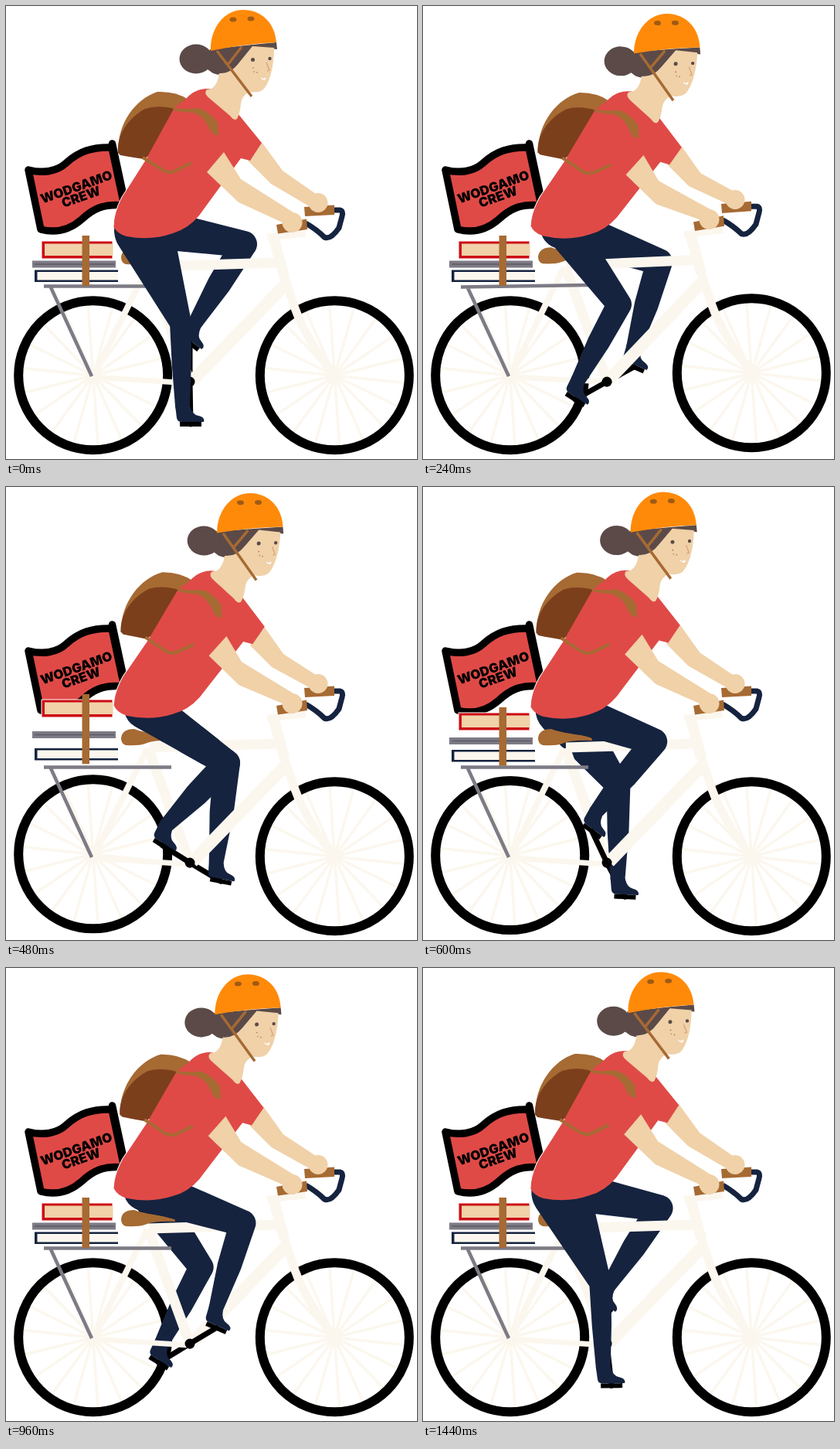
An HTML page for the animation above (1500 ms loop, 532 by 586 pixels).

```html
<!DOCTYPE html>
<html lang="en">
<head>
<meta charset="utf-8">
<title>Cyclist</title>
<style>
html, body { margin: 0; width: 100%; height: 100%; overflow: hidden; background: #fff; }
svg { display: block; width: 100%; height: 100%; }
.cream { fill: none; stroke: #fcf7ee; }
.skin { fill: #f0d1a8; }
.navy { fill: #15233f; }
.red { fill: #df4a47; }
.brown { fill: #a66a33; }
.strap { fill: none; stroke: #a66a33; }
.hair { fill: #5b4a48; }
.crank { stroke: #000; stroke-width: 7; stroke-linecap: round; }
text { font: 900 16.8px Inter, "Liberation Sans", Arial, sans-serif; text-anchor: middle; }
</style>
</head>
<body>
<svg viewBox="0 0 532 586">
  <g id="rear"></g>
  <g id="front"></g>

  <g id="farLeg"></g>

  <g id="frame">
    <g class="cream">
      <path d="M113 479L183 338" stroke-width="8"/>
      <path d="M113 480L238 488" stroke-width="7"/>
      <path d="M185 337L352 332" stroke-width="13"/>
      <path d="M184 338L238 486" stroke-width="13"/>
      <path d="M364 358L241 485" stroke-width="16"/>
      <path d="M346 298L360 350" stroke-width="14"/>
      <path d="M357 340L374 391Q388 430 425 478" stroke-width="11"/>
      <path d="M338 299L388 294" stroke-width="9"/>
    </g>
    <path d="M49 362.5H214M58 364L111 479" fill="none" stroke="#7d7b85" stroke-width="4.5"/>
    <path class="brown" d="M149 325Q150 313 166 313Q178 318 212 322Q219 323 219 328Q192 327 180 332Q172 335 155 334Q149 332 149 325Z"/>
    <path d="M424 264H432Q437 265 435 272L431 287Q420 303 412 299Q402 289 388 281" fill="none" stroke="#15233f" stroke-width="7"/>
    <path class="brown" d="M386 260L425 257.5V270L387 272ZM350 283L389 275.5L390 289L352 294.5Z"/>
  </g>

  <g id="nearLeg"></g>
  <g class="skin">
    <path id="farArm"/>
    <circle id="farHand" cx="404" cy="254.5" r="12.5"/>
  </g>

  <g stroke="#000" stroke-width="9.5" stroke-linejoin="round" stroke-linecap="round">
    <path class="red" d="M29 212C48 217 66 214 78 203C94 188 112 182 137 183L153 258C126 255 112 263 98 276C82 290 64 294 45 289Z"/>
    <path d="M137.500 178L153 250"/>
  </g>
  <g transform="rotate(-19.5 91 234)">
    <text x="91" y="240">WODGAMO</text>
    <text x="92.500" y="254">CREW</text>
  </g>

  <g id="torso">
    <path class="brown" d="M145 190C144 151 168 120 196 111Q220 110 236 121L190 190Z"/>
    <path d="M145 190C143 167 158 145 180 133Q198 127 222 134L186 199Q164 196 148 193Z" fill="#7b3f1c"/>
    <path class="red" d="M262 107Q244 106 231 122Q221 128 216 135L183 195L150 247Q139 268 139 285Q144 295 156 298Q188 304 216 294Q236 288 250 271L304 197L316 200L331 177L300 139L280 110Z"/>
    <path d="M183 195L150 247Q139 268 139 285" fill="none" stroke="#fff"/>
    <path class="strap" d="M177 196L204 213Q212 217 220 213L240 203" stroke-width="4"/>
    <path class="brown" d="M215 132Q234 134 248 132Q262 135 274 151L275 167Q269 169 263 159Q256 142 242 138L219 136Z"/>
    <path class="hair" d="M264 56L319 50L350 47L351 56L319 53L300 76Q286 94 268 87L258 80Z"/>
    <ellipse id="bun" class="hair" cx="246" cy="68.5" rx="21.5" ry="19"/>
    <path class="skin" d="M319 52L347 54C347 74 343 96 334 107Q328 113 315 111Q305 116 304 126Q303 139 299 146Q295 149 290 142L264 120Q255 113 260 108Q273 108 276 87Q291 88 302 73Z"/>
    <path d="M265 58C264 28 283 5 307 5C331 5 348 22 350 47Q308 49 265 58Z" fill="#ff8a0a"/>
    <g fill="#a05a14"><ellipse cx="294" cy="17.5" rx="4.5" ry="3"/><ellipse cx="317" cy="16.5" rx="4.5" ry="3"/></g>
    <path class="strap" d="M273 58L318 117M305 53L287 76" stroke-width="3.5"/>
    <g class="hair"><circle cx="319.5" cy="69.5" r="2.5"/><circle cx="341.5" cy="68" r="2.2"/></g>
    <path d="M337 73L341 83L338 84" fill="none" stroke="#dca780" stroke-width="1.5"/>
    <path d="M330 93Q333 96 336 93Q336 98 330 93Z" fill="#fff" stroke="#fff"/>
    <g fill="#a66a33"><circle cx="320" cy="80" r=".8"/><circle cx="325" cy="86" r=".8"/><circle cx="321" cy="85" r=".7"/></g>
  </g>

  <g id="bookC"><path class="navy" d="M37 341.500H145V357H37Z"/><path d="M40.500 344H145V354.500H40.500Z" fill="#fcf7ee"/></g>
  <g id="bookB"><path d="M34 329.500H142V338.500H34Z" fill="#7d7b85"/><path d="M37 334H140" stroke="#5e5a66" stroke-width="1.5"/></g>
  <g id="bookA"><path d="M46 304H138V327H46Z" fill="#cc0a14" stroke="#fff"/><path class="skin" d="M50 307.500H138.500V323H50Z"/></g>
  <rect id="band" class="brown" x="98.500" width="9.500"/>

  <g class="skin">
    <path id="nearArm"/>
    <circle id="nearHand" cx="370.500" cy="280" r="13"/>
  </g>
</svg>
<script>
const LOOP = 1500, STEP = 60, HUB = [238, 486];
const $ = id => document.getElementById(id);
const rad = deg => deg * Math.PI / 180;
const set = (el, attrs) => { for (const k in attrs) el.setAttribute(k, attrs[k]); };

// One pedal turn: kneeX, kneeY, kneeR, pedalX, pedalY, foot tilt, hipR
const POSES = [
  [226, 410, 14, 239, 541, 0, 38],
  [254, 386, 16, 197, 509, 33, 25],
  [286, 357, 17, 203, 464, 33, 27],
  [308, 308, 17, 238, 436, 38, 27],
  [306, 331, 17, 273, 467, 23, 28],
  [286, 357, 17, 278, 510, 11, 27]
];
const LEAN = [0, 2, 2, 0, 1.4, 2.7];

// Closed Catmull-Rom curve through the values, one unit per value
function curve(vals, s) {
  const n = vals.length, i = Math.floor(s), u = s - i;
  const [a, b, c, d] = [-1, 0, 1, 2].map(k => vals[(i + k + n) % n]);
  return b + u / 2 * (c - a + u * (2 * a - 5 * b + 4 * c - d + u * (3 * (b - c) + d - a)));
}

const pulse = (t, from, to) =>
  t > from && t < to ? Math.sin(Math.PI * (t - from) / (to - from)) : 0;

function turn([x, y], deg, [cx, cy] = [0, 0]) {
  const c = Math.cos(rad(deg)), s = Math.sin(rad(deg));
  return [cx + (x - cx) * c - (y - cy) * s, cy + (x - cx) * s + (y - cy) * c];
}

// Outline around two circles, the first one larger
function limb(a, ra, b, rb) {
  const dx = b[0] - a[0], dy = b[1] - a[1], dir = Math.atan2(dy, dx);
  const q = Math.acos((ra - rb) / Math.hypot(dx, dy));
  const at = (p, r, w) => `${p[0] + r * Math.cos(w)} ${p[1] + r * Math.sin(w)}`;
  return `M${at(a, ra, dir + q)}A${ra} ${ra} 0 1 1 ${at(a, ra, dir - q)}` +
    `L${at(b, rb, dir - q)}A${rb} ${rb} 0 0 1 ${at(b, rb, dir + q)}Z`;
}

function buildWheel(id, cx) {
  let spokes = '';
  for (let i = 0; i < 18; i++) {
    const w = rad(i * 20 + 6);
    spokes += `M${cx} 478l${90 * Math.cos(w)} ${90 * Math.sin(w)}`;
  }
  $(id).innerHTML = `<path class="cream" stroke-width="3.5" d="${spokes}"/>
    <circle cx="${cx}" cy="478" r="10" fill="#fcf7ee"/>
    <circle cx="${cx}" cy="477.8" r="96.5" fill="none" stroke="#000" stroke-width="12"/>`;
}

function buildLeg(id) {
  $(id).innerHTML = `<line class="crank" x1="${HUB[0]}" y1="${HUB[1]}"/>
    <circle cx="${HUB[0]}" cy="${HUB[1]}" r="6.5"/>
    <path class="navy"/>
    <g><path d="M-14-3H14V3H-14Z"/>
    <path class="navy" d="M-20-24L-18-8Q-17-3-12-3H17Q19-9 10-11Q2-12-1-24Z"/></g>`;
  const [crank, , shape, foot] = $(id).children;
  return s => {
    const [kx, ky, kr, px, py, tilt, hr] = POSES[0].map((_, i) => curve(POSES.map(p => p[i]), s));
    const [ax, ay] = turn([-10.5, -24], tilt);
    const hip = [180 - (hr - 27) * .18, 286 + (hr - 27) * .36], knee = [kx, ky];
    const ankle = [px + ax, py + ay], calfR = kr - 1.5;
    const calf = knee.map((k, i) => k + (ankle[i] - k) * .5);
    set(crank, { x2: px, y2: py });
    set(shape, { d: limb(hip, hr, knee, kr) + limb(knee, kr, calf, calfR) + limb(calf, calfR, ankle, 9.5) });
    set(foot, { transform: `translate(${px} ${py}) rotate(${tilt})` });
  };
}

const WAIST = [170, 290];
// Sleeve points follow the lean, elbow half of it, wrist stays on the bar
function drawArm(id, pts, lean, lift) {
  const follow = [1, .5, 0, 0, .5, 1];
  const p = pts.map((pt, i) => {
    const [x, y] = turn(pt, lean * follow[i], WAIST);
    return `${x} ${y - (follow[i] ? 0 : lift)}`;
  });
  set($(id), { d: `M${p.join('L')}Z` });
}

buildWheel('rear', 112.7);
buildWheel('front', 425.3);
const nearLeg = buildLeg('nearLeg'), farLeg = buildLeg('farLeg');
const shift = (id, dy) => set($(id), { transform: `translate(0 ${dy})` });

function draw(t) {
  // The second half turn runs slightly slower
  const s = t < 720 ? t / 240 : 3 + (t - 720) / 250;
  const lean = curve(LEAN, s);
  const bump = pulse(t, 120, 360), kick = pulse(t, 390, 630);

  nearLeg(s);
  farLeg((s + 3) % 6);
  set($('torso'), { transform: `rotate(${lean} ${WAIST}) translate(0 ${-2 * kick})` });
  set($('bun'), { transform: `translate(${1.2 * lean} 0)` });

  const k = .015 * bump, lift = 4 * bump;
  set($('frame'), { transform: `matrix(1 ${-k} 0 1 0 ${112 * k})` });
  drawArm('nearArm', [[282, 189], [304, 224], [372, 267], [360, 281], [301, 254], [260, 215]], lean, lift);
  drawArm('farArm', [[331, 176], [358, 213], [401, 243], [394, 260], [343, 230], [313, 200]], lean, lift);
  shift('nearHand', -lift);
  shift('farHand', -lift);

  shift('front', -3 * bump);
  shift('rear', -3.2 * kick);
  shift('bookA', -31.4 * kick);
  shift('bookB', -14.6 * kick);
  shift('bookC', -3.8 * kick);
  set($('band'), { y: 297 - 31.4 * kick, height: 65 + 27.4 * kick });
}

function tick() {
  draw(Math.floor(performance.now() % LOOP / STEP) * STEP);
  requestAnimationFrame(tick);
}
tick();
</script>
</body>
</html>
```
